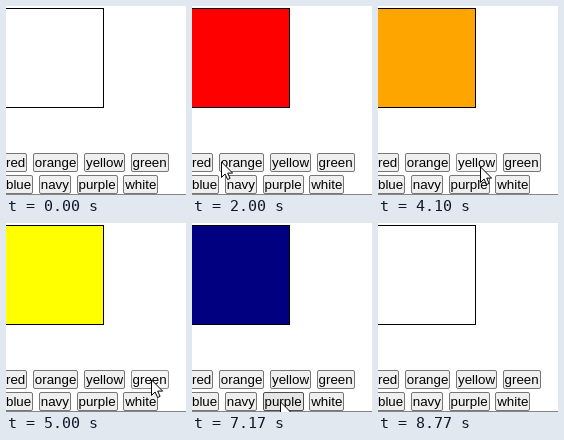
Recreate the animation shown at these times as an HTML page. Size 180x189 px, loop 8.81 s.

```html
<!DOCTYPE html>
<html lang="en">
<head>
<meta charset="utf-8">
<title>Colour buttons</title>
<style>
  html, body { margin: 0; width: 100%; height: 100%; overflow: hidden; background: #fff; }
  #stage { position: relative; width: 180px; height: 189px; overflow: hidden; }
  #stage > * { position: absolute; box-sizing: border-box; }
  #box { left: -2px; top: 2px; width: 100px; height: 100px; border: 1px solid #000; }
  #line { left: 0; top: 188px; width: 180px; height: 1px; background: #858585; }
  .row { left: -2px; display: flex; gap: 5.6px; }
  .btn {
    padding: 1px; border: 1px solid #767676; border-radius: 2px; background: #efefef;
    font: 13.333px/15px "Liberation Sans", Arial, sans-serif; color: #000;
    white-space: nowrap;
  }
  .btn.hover { background: #e5e5e5; border-color: #4f4f4f; }
  .btn.press { background: #f5f5f5; border-color: #8d8d8d; }
  #cursor { left: 0; top: 0; width: 13px; height: 20px; }
</style>
</head>
<body>
<div id="stage">
  <div id="box"></div>
  <div class="row" style="top:147px"></div>
  <div class="row" style="top:169px"></div>
  <div id="line"></div>
  <svg id="cursor" viewBox="0 0 13 20">
    <path d="M.5 .9V16.4L4.1 13 6.6 18.5 9.1 17.4 6.7 12.1H11.6Z" fill="#fff" stroke="#000"/>
  </svg>
</div>
<script>
const LOOP = 8810, TICK = 100 / 3, ENTER = 770, LEAVE = 8770, HOLD = 80;
const names = 'red orange yellow green blue navy purple white'.split(' ');
const presses = [1470, 2570, 4100, 5000, 5870, 6800, 7600, 8500];
const entry = [46, 181];

// pointer moves: start, end, x, y
const moves = [
  [760, 870, 10, 152], [1040, 1150, 12, 122], [1150, 1240, 10, 152],
  [1840, 2160, 47, 157], [2800, 3000, 86, 163], [3170, 3500, 58, 160],
  [3500, 3900, 102, 160], [4300, 4530, 145, 156], [5140, 5770, 12, 176],
  [6140, 6270, 45, 177], [7040, 7190, 91, 178], [7840, 8100, 131, 177],
  [8680, 8750, 170, 184]
];

const box = document.getElementById('box');
const cursor = document.getElementById('cursor');
const rows = document.querySelectorAll('.row');

const buttons = names.map((name, i) => {
  const el = document.createElement('div');
  el.className = 'btn';
  el.textContent = name;
  rows[i >> 2].append(el);
  return { name, el, down: presses[i], up: presses[i] + HOLD };
});
for (const b of buttons) b.area = b.el.getBoundingClientRect();

const ease = u => u * u * (3 - 2 * u);

function pointerAt(t) {
  let [x, y] = entry;
  for (const [start, end, toX, toY] of moves) {
    const k = ease(Math.min(1, Math.max(0, (t - start) / (end - start))));
    x += (toX - x) * k;
    y += (toY - y) * k;
  }
  return [Math.round(x), Math.round(y)];
}

const inside = (a, [x, y]) => x >= a.left && x < a.right && y >= a.top && y < a.bottom;

function draw(t) {
  const shown = t >= ENTER && t < LEAVE;
  const tick = Math.floor((t + 3.4) / TICK) * TICK;
  const [x, y] = pointerAt(tick);
  const felt = pointerAt(tick - TICK);   // hover lags the pointer by one tick
  let fill = 'white';
  for (const b of buttons) {
    b.el.classList.toggle('hover', shown && inside(b.area, felt));
    b.el.classList.toggle('press', t >= b.down && t < b.up);
    if (t >= b.up) fill = b.name;
  }
  box.style.background = fill;
  cursor.style.visibility = shown ? 'visible' : 'hidden';
  cursor.style.transform = `translate(${x}px,${y}px)`;
}

let start;
function frame(now) {
  start ??= now;
  draw((now - start) % LOOP);
  requestAnimationFrame(frame);
}
draw(0);
requestAnimationFrame(frame);
</script>
</body>
</html>
```
